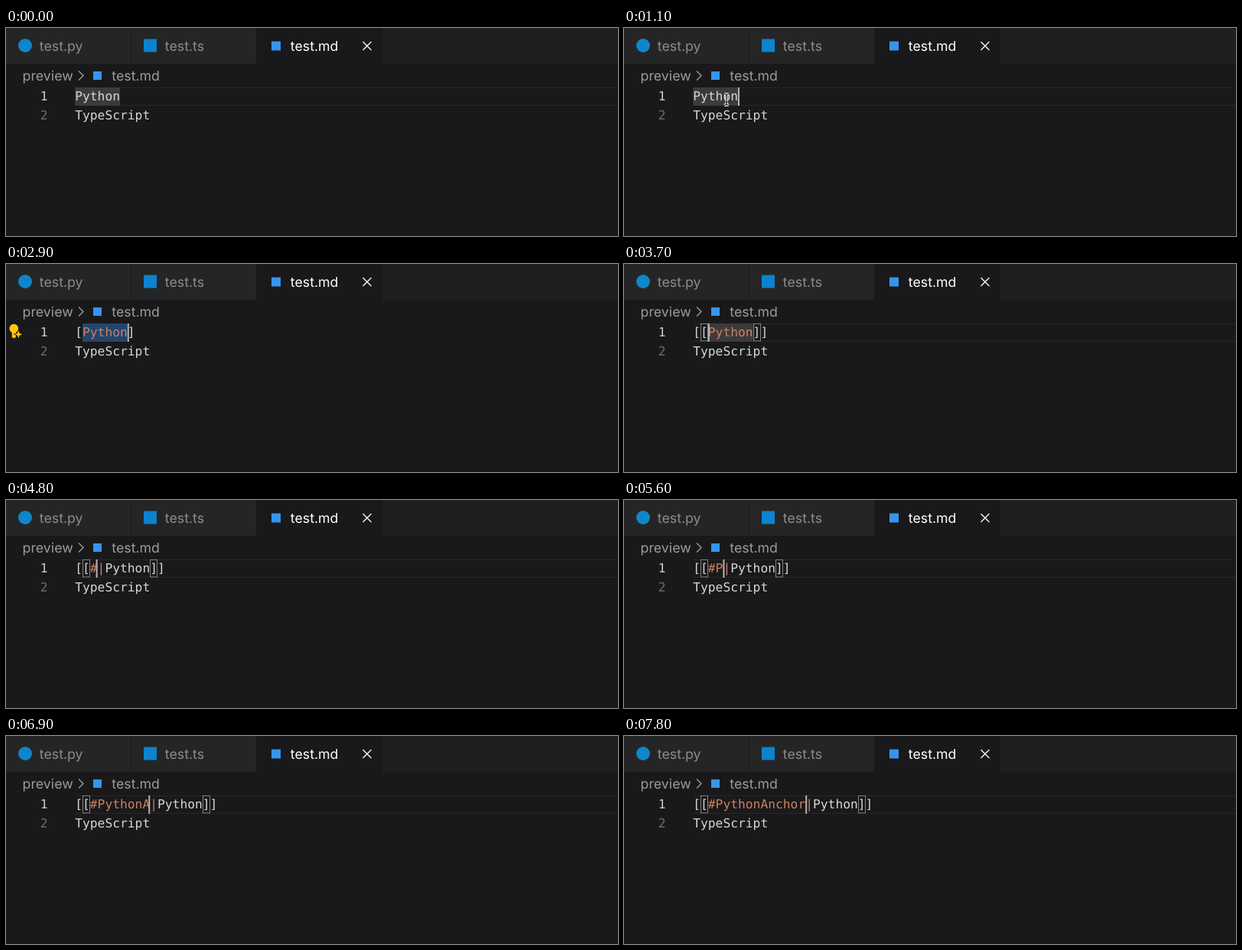
Animation of 800 by 273 pixels, one loop 8000 ms. Source, as an HTML page with a canvas:

```html
<!DOCTYPE html>
<html lang="en">
<head>
<meta charset="utf-8">
<title>Editor: linking a word to an anchor</title>
<style>
  html, body { margin: 0; width: 100%; height: 100%; overflow: hidden; background: #19191b; }
  canvas { display: block; width: 800px; height: 273px; }
</style>
</head>
<body>
<canvas id="stage"></canvas>
<script>
const W = 800, H = 273, LOOP = 8000, STEP = 100;
const LEFT = 90.2, CELL = 9.8, TOP = 78;
const BASE = 95.4, ROW = 24.6;
const UI = '17.75px Inter, "Liberation Sans", sans-serif';
const CODE = '16.3px "DejaVu Sans Mono", "Noto Sans Mono", monospace';
const TEXT = '#d6d6d6', LINK = '#cd7f63', BLUE = '#3794ef';

const canvas = document.getElementById('stage');
const ctx = canvas.getContext('2d');
const scale = window.devicePixelRatio || 1;
canvas.width = W * scale;
canvas.height = H * scale;

// Editing steps: text, caret column, coloured span, selected / highlighted span
const edits = [
  { at: -400, text: 'Python', caret: 6, word: [0, 6] },
  { at: 1500, text: 'Python', caret: 6, sel: [0, 6] },
  { at: 2500, text: '[Python]', caret: 7, sel: [1, 7], link: [1, 7] },
  { at: 3000, text: '[[Python]]', caret: 8, sel: [2, 8], link: [2, 8] },
  { at: 3500, text: '[[Python]]', caret: 2, link: [2, 8], pair: true },
  { at: 3700, text: '[[Python]]', caret: 2, word: [2, 8], link: [2, 8], pair: true }
];

function addEdit(at, anchor, caret) {
  edits.push({
    at, caret, text: `[[${anchor}|Python]]`,
    link: [2, anchor.length + 3], pair: true
  });
}
addEdit(3900, '', 3);
addEdit(4300, '', 2);
const anchor = '#PythonAnchor';
[4800, 5300, 5800, 6100, 6200, 6400, 6500, 6900, 7200, 7300, 7500, 7600, 7700]
  .forEach((at, i) => addEdit(at, anchor.slice(0, i + 1), i + 3));

const bulbTimes = [[1800, 2500], [2800, 3000], [3300, 3700]];
const within = (t, [a, b]) => t >= a && t < b;
const colX = col => LEFT + col * CELL;

function box(x, y, w, h, color) {
  ctx.fillStyle = color;
  ctx.fillRect(x, y, w, h);
}

function disc(x, y, r, color) {
  ctx.fillStyle = color;
  ctx.beginPath();
  ctx.arc(x, y, r, 0, Math.PI * 2);
  ctx.fill();
}

function stroke(lines, color, width) {
  ctx.strokeStyle = color;
  ctx.lineWidth = width;
  ctx.beginPath();
  for (const line of lines) {
    line.forEach(([x, y], i) => i ? ctx.lineTo(x, y) : ctx.moveTo(x, y));
  }
  ctx.stroke();
}

function label(text, x, y, color) {
  ctx.font = UI;
  ctx.fillStyle = color;
  ctx.fillText(text, x, y);
}

function codeLine(text, x, y, color, link) {
  ctx.font = CODE;
  [...text].forEach((ch, i) => {
    ctx.fillStyle = link && within(i, link) ? LINK : color;
    ctx.fillText(ch, x + i * CELL, y);
  });
}

function drawChrome() {
  box(0, 0, W, H, '#19191b');
  box(0, 0, W, 47, '#1f1f20');
  box(0, 0, 163, 47, '#252526');
  box(164, 0, 163, 47, '#252526');
  box(163, 0, 1, 47, '#1b1b1c');
  box(327, 0, 165, 47, '#19191b');

  disc(25, 23, 9, '#0f86c9');
  box(180, 14.5, 17, 17, '#0d83cd');
  box(347, 17.5, 12, 12, BLUE);
  label('test.py', 43.8, 29.8, '#8c8c8d');
  label('test.ts', 207.8, 29.8, '#8c8c8d');
  label('test.md', 371.8, 29.8, '#ffffff');
  stroke([[[466.5, 18], [477.5, 29]], [[477.5, 18], [466.5, 29]]], '#f0f0f0', 1.5);

  label('preview', 21.6, 68.8, '#9c9c9d');
  stroke([[[95, 56.5], [101, 62.5], [95, 68.5]]], '#9c9c9d', 1.4);
  box(114, 57, 11, 11, BLUE);
  label('test.md', 138.3, 68.8, '#9c9c9d');
}

function drawBulb() {
  const c = '#fdc50e';
  disc(10.3, 84.6, 5.9, c);
  box(7.7, 88, 5.2, 7.6, c);
  disc(10.3, 95, 2.4, c);
  const star = r => {
    ctx.beginPath();
    for (let i = 0; i < 8; i++) {
      const a = i * Math.PI / 4, d = i % 2 ? r * 0.38 : r;
      ctx.lineTo(16.3 + d * Math.cos(a), 92.3 + d * Math.sin(a));
    }
    ctx.closePath();
    ctx.fill();
  };
  ctx.fillStyle = '#19191b';
  star(6.8);
  ctx.fillStyle = c;
  star(5);
}

function drawPointer(t) {
  const p = Math.min(1, (t - 400) / 700);
  const e = p * p * (3 - 2 * p);
  const x = 522 + (134 - 522) * e, y = 263 + (94 - 263) * e;
  const beam = [
    [[x - 3, y - 7.5], [x - 1, y - 7], [x, y - 5.5], [x, y + 5.5], [x - 1, y + 7], [x - 3, y + 7.5]],
    [[x + 3, y - 7.5], [x + 1, y - 7], [x, y - 5.5]],
    [[x, y + 5.5], [x + 1, y + 7], [x + 3, y + 7.5]],
    [[x - 2, y + 3], [x + 2, y + 3]]
  ];
  stroke(beam, '#f2f2f2', 3.4);
  stroke(beam, '#111111', 1.2);
}

function drawCaret(t, step, previous) {
  // The first caret is in its hidden phase when the loop begins
  const phase = step.at < 0 ? t + 900 : t - step.at;
  if (phase % 1000 >= 500) return;
  // The caret glides to its new column and is nearly there on the first step
  const glide = Math.min(1, (t - step.at + 80) / 100);
  const col = previous.caret + (step.caret - previous.caret) * glide;
  box(colX(col), TOP, 2, 24, '#b4b4b3');
}

function drawEditor(t) {
  const index = edits.filter(e => e.at <= t).length - 1;
  const s = edits[index];
  const span = s.sel || s.word;
  if (!s.sel) {
    box(LEFT, TOP, W - LEFT, 1, '#272729');
    box(LEFT, TOP + 23, W - LEFT, 1, '#272729');
  }
  if (span) {
    box(colX(span[0]), TOP, (span[1] - span[0]) * CELL, 24, s.sel ? '#22466f' : '#3b3b3c');
  }
  if (s.pair) {
    ctx.strokeStyle = '#828283';
    ctx.lineWidth = 1;
    for (const col of [1, s.text.length - 2]) {
      ctx.strokeRect(Math.round(colX(col)) + 0.5, TOP + 0.5, 9, 22.5);
    }
  }
  codeLine('1', 44.7, BASE, '#cccccc');
  codeLine('2', 44.7, BASE + ROW, '#6d6d70');
  codeLine(s.text, LEFT, BASE, TEXT, s.link);
  codeLine('TypeScript', LEFT, BASE + ROW, TEXT);
  drawCaret(t, s, edits[Math.max(0, index - 1)]);
}

function draw(now) {
  const t = Math.floor((now % LOOP) / STEP) * STEP;
  ctx.setTransform(scale, 0, 0, scale, 0, 0);
  ctx.textBaseline = 'alphabetic';
  if ('textRendering' in ctx) ctx.textRendering = 'geometricPrecision';
  drawChrome();
  drawEditor(t);
  if (bulbTimes.some(range => within(t, range))) drawBulb();
  if (within(t, [400, 2500])) drawPointer(t);
}

const start = performance.now();
function tick() {
  draw(performance.now() - start);
  requestAnimationFrame(tick);
}
tick();
</script>
</body>
</html>
```
